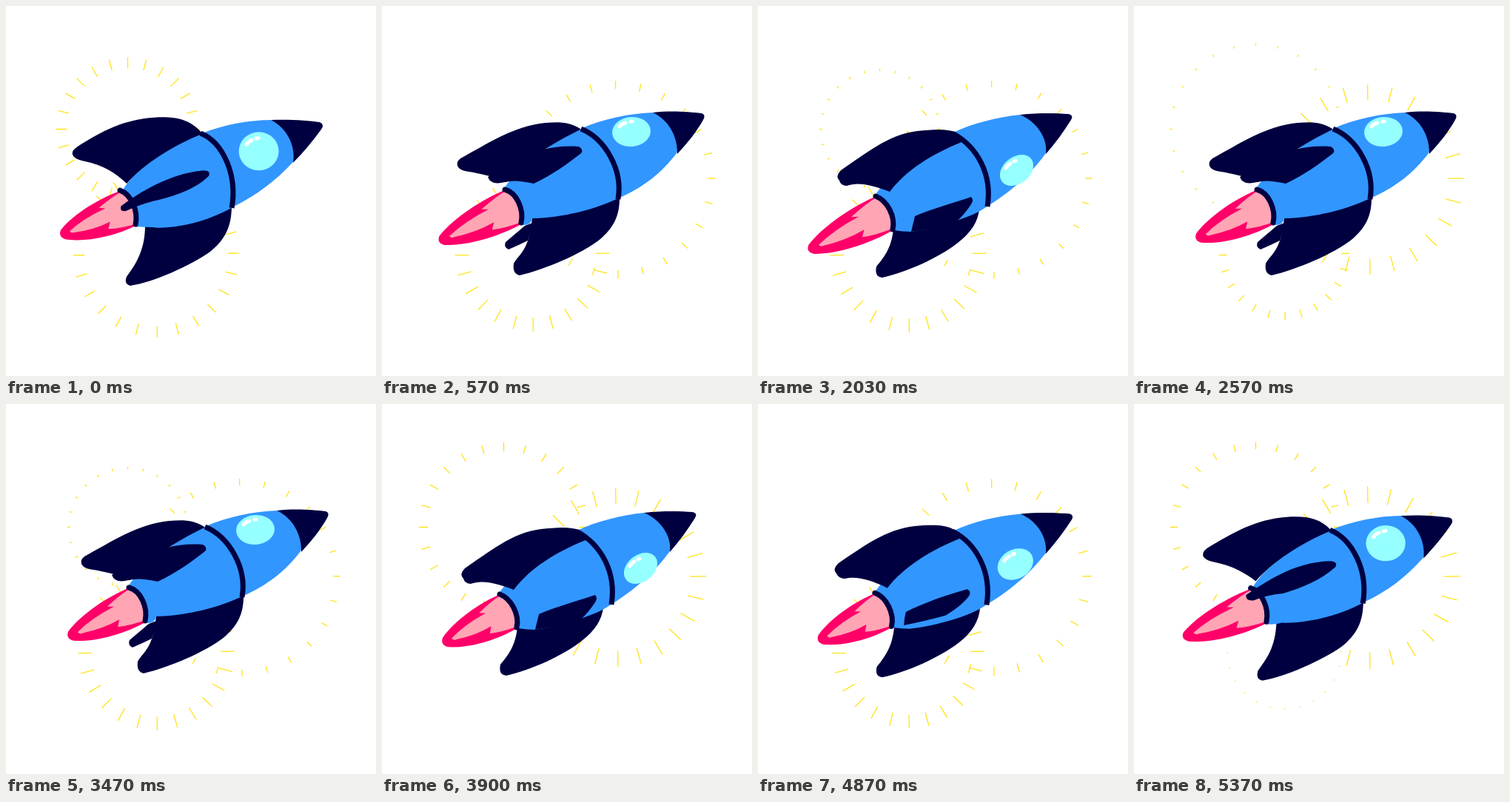
Recreate the animation shown at these times as an HTML page. Size 500x500 px, loop 5410 ms.

```html
<!DOCTYPE html>
<html lang="en">
<head>
<meta charset="utf-8">
<title>Rocket</title>
<style>
  html, body { margin: 0; width: 100%; height: 100%; overflow: hidden; background: #fff; }
  svg { display: block; width: 100vw; height: 100vh; }
</style>
</head>
<body>
<svg id="stage" viewBox="0 0 500 500"></svg>
<script>
const LOOP = 5410, ROLL = 900, FLICKER = 300, BURST = 720;
const NAVY = '#000040', BLUE = '#3296ff', CYAN = '#96ffff', PINK = '#ff0069', ROSE = '#ffa5b4', YELLOW = '#ffe31a';

const stage = document.getElementById('stage');
function add(tag, attrs, parent = stage) {
  const el = document.createElementNS('http://www.w3.org/2000/svg', tag);
  for (const key in attrs) el.setAttribute(key, attrs[key]);
  return parent.appendChild(el);
}
const fill = color => ({ fill: color });
const line = (color, width) => ({ fill: 'none', stroke: color, 'stroke-width': width, 'stroke-linecap': 'round' });
const lerp = (a, b, k) => a + (b - a) * k;

// Bursts of 24 rays; each ray travels outward from `from` to `to`.
const bursts = [
  { x: 164.5, y: 166.5, from: 78, to: 115, start: 572, life: 580, turn: 0 },
  { x: 203, y: 335.5, from: 76, to: 114, start: 328, life: 570, turn: -0.013 },
  { x: 317.3, y: 234.5, from: 88, to: 133, start: 45, life: 620, turn: -0.013 }
];
for (const b of bursts) b.el = add('path', { ...line(YELLOW, 1.3), 'stroke-linecap': 'butt' });

const flame = add('g', {});
add('path', { ...fill(PINK), d: 'M12 -25H3C-30 -27 -72 -21 -98 -7Q-105 0 -97 7C-75 20 -35 29 3 26H12Z' }, flame);
add('path', { ...fill(ROSE), d: 'M14 -24H3Q-16 -22 -37 -15L-29 -11Q-62 -10 -87 -1Q-86 3 -82 3Q-55 10 -30 8L-36 16Q-20 22 3 24H14Z' }, flame);

// Every part has three poses: facing front, rolled down, rolled up.
const parts = [
  { // hidden fin
    style: fill(NAVY), poses: [
      'M211 300Q208 306 206 312Q206 318 208 320Q213 316 218 310L223 298Z',
      'M203 300Q200 306 198 312Q198 318 200 320Q205 316 210 310L215 298Z',
      'M193 297Q180 308 167 319Q164 326 171 329Q185 323 197 317L206 292Z']
  },
  { // lower fin
    style: fill(NAVY), poses: [
      'M188 297C188 330 175 350 163 366Q159 376 168 378C200 374 250 350 275 333C295 317 305 300 305 270C270 290 225 300 188 297Z',
      'M183 302C180 328 170 340 160 352Q157 366 168 367C200 360 245 340 270 320C288 306 297 292 299 275C280 286 240 297 183 302Z',
      'M203 284C200 330 185 335 178 348Q176 362 186 364C220 356 270 335 295 315C312 300 322 285 321 255C290 272 245 284 203 284Z']
  },
  { // body
    style: fill(BLUE), poses: [
      'M157 250C180 212 225 185 265 172C295 160 330 154 358 154C390 165 398 192 388 211C365 236 340 255 306 272C265 296 215 302 198 299Q187 299 176 298Q178 270 157 250Z',
      'M157 257C180 225 220 190 262 172C290 158 325 150 354 147C388 156 398 180 389 199C370 225 345 250 300 277C280 288 240 300 207 305Q195 305 184 303Q184 272 157 257Z',
      'M165 248C172 230 225 185 268 166C300 152 335 145 366 144C398 155 408 180 398 199C378 226 350 247 321 259C288 275 245 286 203 287Q201 297 190 296Q190 265 165 248Z']
  },
  { // nose
    style: fill(NAVY), poses: [
      'M358 154C385 153 410 155 424 157Q431 160 426 167C415 182 402 198 388 212C392 190 380 165 358 154Z',
      'M354 147C380 144 405 145 420 146Q427 148 423 154C413 170 402 185 389 200C392 178 376 156 354 147Z',
      'M366 144C390 141 415 143 432 145Q438 147 434 154C425 170 413 185 399 200C400 178 388 154 366 144Z']
  },
  { // upper fin
    style: fill(NAVY), poses: [
      'M265 172C248 152 228 149 200 150.5C160 153 130 168 96 190Q86 197 91 203Q96 208 108 210C130 215 148 225 163 240C185 214 228 187 265 173Z',
      'M268 171C255 165 235 167 215 169C175 174 145 200 112 222Q104 230 110 236Q112 243 120 243C135 237 155 242 178 251C200 222 235 200 275 184Z',
      'M268 166C255 157 240 156 220 158C178 162 143 186 106 206Q98 212 104 219Q108 223 118 224C130 226 150 230 168 238C190 212 225 188 268 167Z']
  },
  { // middle fin
    style: fill(NAVY), poses: [
      'M155 270C180 251 222 226 264 222Q277 221 274 229C255 248 225 257 200 263Q180 268 161 277Q152 277 155 270Z',
      'M212 284C235 274 265 266 288 258Q292 262 288 268C282 277 276 284 268 292Q240 300 207 305Q210 292 212 284Z',
      'M143 231C165 222 200 185 266 190Q273 194 269 199C250 214 230 228 205 240Q180 234 166 238Q147 243 143 231Z']
  },
  { // band
    style: { ...line(NAVY, 7), 'stroke-linecap': 'butt' }, poses: [
      'M263 172C293 184 313 228 305 273',
      'M263 172C296 190 317 227 310 271',
      'M269 166C301 179 326 221 319 261']
  },
  { // collar
    style: line(NAVY, 7), poses: [
      'M154 249C168 254 179 275 175 295',
      'M159 257C175 263 186 285 182 302',
      'M166 248C182 252 192 275 188 293']
  }
];
const glint = {
  style: line('#fff', 5), poses: [
    'M325 187Q327 183 332 181M338 179L341 178',
    'M335 219Q337 215 341 213M346 210L348 209',
    'M321 163Q324 159 329 158M336 156L338 156']
};
for (const part of parts) part.el = add('path', part.style);
const porthole = add('ellipse', fill(CYAN));
glint.el = add('path', glint.style);

// Window: x, y, rx, ry, tilt. Exhaust: x, y, tilt.
const portholePoses = [[341.5, 196, 27, 26, 0], [349.5, 222, 25, 18, -38], [337, 170, 26, 20, -5]];
const exhaustPoses = [[164.5, 273, -22.3], [170, 280, -26.5], [177.5, 271, -25.4]];
const flameLengths = [[0, 97], [100, 95], [170, 102], [235, 113], [270, 110], [300, 97]];

function morph(poses, side, k) {
  const target = poses[side].match(/-?[\d.]+/g);
  let i = 0;
  return poses[0].replace(/-?[\d.]+/g, n => lerp(+n, +target[i++], k).toFixed(2));
}
const blend = (poses, side, k) => poses[0].map((n, i) => lerp(n, poses[side][i], k));

function sample(keys, t) {
  const i = keys.findIndex(key => key[0] > t);
  const [t0, v0] = keys[i - 1], [t1, v1] = keys[i];
  return lerp(v0, v1, (t - t0) / (t1 - t0));
}

function rays(b, t) {
  const u = ((t - b.start + BURST) % BURST) / b.life;
  if (u >= 1) return '';
  const inner = lerp(b.from, b.to, u ** 1.6);
  const outer = lerp(b.from, b.to, 1 - (1 - u) ** 2.3) + 1;
  let d = '';
  for (let i = 0; i < 24; i++) {
    const a = i * Math.PI / 12 + b.turn, c = Math.cos(a), s = Math.sin(a);
    d += `M${b.x + c * inner} ${b.y + s * inner}L${b.x + c * outer} ${b.y + s * outer}`;
  }
  return d;
}

function draw(t) {
  for (const b of bursts) b.el.setAttribute('d', rays(b, t % BURST));

  const swing = Math.sin(t / ROLL * 2 * Math.PI);
  const side = swing >= 0 ? 1 : 2;
  const k = Math.min(1, 1.5 * Math.abs(swing));
  for (const part of [...parts, glint]) part.el.setAttribute('d', morph(part.poses, side, k));

  const [x, y, rx, ry, tilt] = blend(portholePoses, side, k);
  porthole.setAttribute('rx', rx);
  porthole.setAttribute('ry', ry);
  porthole.setAttribute('transform', `translate(${x} ${y}) rotate(${tilt})`);

  const [fx, fy, angle] = blend(exhaustPoses, side, k);
  const length = sample(flameLengths, t % FLICKER) / 100;
  flame.setAttribute('transform', `translate(${fx} ${fy}) rotate(${angle}) scale(${length} 1)`);
}

const begin = performance.now();
function tick() {
  draw((performance.now() - begin) % LOOP);
  requestAnimationFrame(tick);
}
tick();
</script>
</body>
</html>
```
